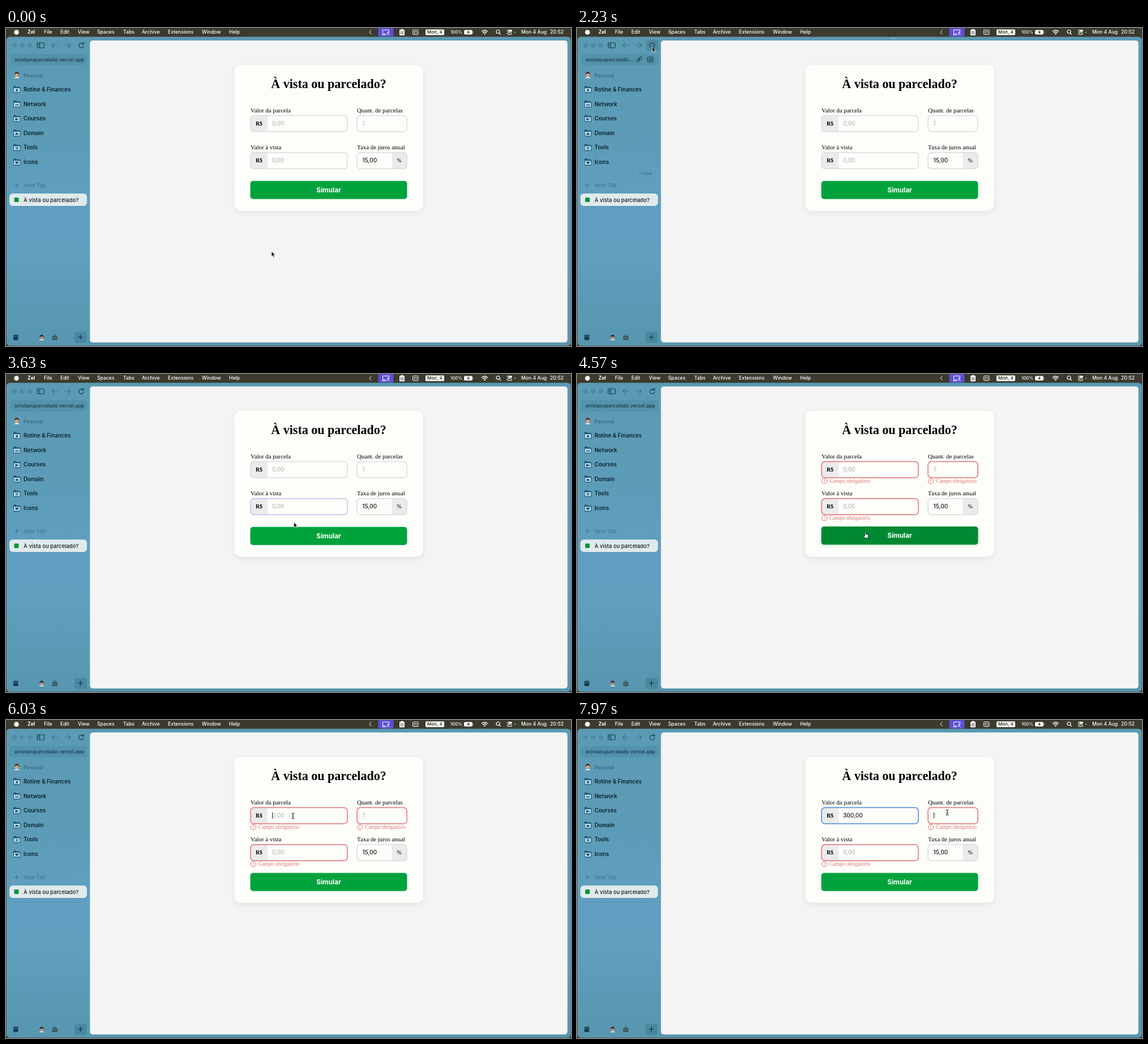
Recreate the animation shown at these times as an HTML page. Size 998 by 561 pixels, loop 8000 ms.

```html
<!DOCTYPE html>
<html lang="pt-BR">
<head>
<meta charset="utf-8">
<title>À vista ou parcelado?</title>
<style>
  html, body { margin: 0; width: 100%; height: 100%; overflow: hidden; background: #3c3a2e; }
  svg { display: block; width: 100%; height: 100%; }
  text { white-space: pre; }
  .ui { font-family: Inter, sans-serif; font-weight: 500; }
  .bold { font-weight: 600; }
  .serif { font-family: "Liberation Serif", serif; }
  .input { font: 400 10px Inter, sans-serif; }
  .filled { font-weight: 500; fill: #161618; }
  .line { fill: none; stroke-linecap: round; stroke-linejoin: round; }
</style>
</head>
<body>
<svg viewBox="0 0 998 561" xmlns="http://www.w3.org/2000/svg">
  <defs>
    <linearGradient id="wall" x2="0" y2="1">
      <stop offset="0" stop-color="#5b9ab3"/>
      <stop offset=".35" stop-color="#5d9cb8"/>
      <stop offset=".6" stop-color="#609fc2"/>
      <stop offset=".72" stop-color="#5f9ebd"/>
      <stop offset="1" stop-color="#5796af"/>
    </linearGradient>
    <filter id="soft" x="-10%" y="-10%" width="120%" height="125%">
      <feDropShadow dx="0" dy="3" stdDeviation="5" flood-color="#303050" flood-opacity=".08"/>
    </filter>
    <filter id="lift" x="-5%" y="-20%" width="110%" height="160%">
      <feDropShadow dx="0" dy="2" stdDeviation="2" flood-color="#008832" flood-opacity=".2"/>
    </filter>
  </defs>

  <rect width="998" height="561" fill="#3c3a2e"/>
  <rect x=".7" y="15.5" width="997" height="545" rx="6" fill="url(#wall)"/>

  <!-- menu bar -->
  <g id="menu" class="ui" font-size="8.65" fill="#fff">
    <circle cx="18.5" cy="7.5" r="4.3"/>
    <text x="38" y="10.3" style="font-weight:700">Zel</text>
    <path class="line" d="M645 4l-3 3.5 3 3.5" stroke="#fff"/>
    <rect x="657.5" width="27" height="15" rx="2" fill="#5c50d4"/>
    <g class="line" stroke="#fff">
      <path d="M671 10.5h-5.500v-7h11v3M664.500 12h6"/>
      <circle cx="675" cy="8" r="1.2"/><path d="M672.500 12q2.500-3 5 0"/>
    </g>
    <rect x="695" y="3" width="9" height="10" rx="1"/><rect x="697.500" y="1.700" width="4" height="2.600" rx="1"/>
    <path d="M696.500 6.500h6M696.500 8.500h6M696.500 10.500h6" stroke="#44443c" stroke-width=".8"/>
    <rect class="line" x="718.500" y="3.500" width="9.500" height="8" rx="1" stroke="#fff"/>
    <path d="M720 6.500h6.500M720 9h3M724.500 9h2" stroke="#fff"/>
    <rect x="741" y="2.500" width="33" height="10" rx="1.500"/>
    <text class="bold" x="744" y="10.200" font-size="8" fill="#33332d">Mon, 4</text>
    <text x="785" y="10" font-size="7.800">100%</text>
    <rect x="809" y="3.500" width="15" height="8" rx="2.500"/><path d="M825 6v3q1.500-1.500 0-3"/>
    <path d="M818 3.800l-4 4.200h2.500l-1 3 4-4.200h-2.500z" fill="#33332d"/>
    <path class="line" d="M840.500 6q5-4 10 0M842.500 8.300q3-2.400 6 0" stroke="#fff" stroke-width="1.500"/>
    <circle cx="845.500" cy="10.500" r="1.200"/>
    <g class="line" stroke="#fff" stroke-width="1.200"><circle cx="869" cy="6.500" r="3"/><path d="M871.200 8.700l2.300 2.500"/></g>
    <rect x="885" y="3" width="9" height="3.800" rx="1.900"/>
    <rect class="line" x="885.500" y="8.300" width="8" height="3.200" rx="1.600" stroke="#fff"/>
    <circle cx="887" cy="4.900" r="1.100" fill="#3c3a2e"/>
    <circle cx="899" cy="7.500" r="1.300" fill="#35c759"/>
    <text x="910" y="10.300">Mon 4 Aug</text><text x="961" y="10.300">20:52</text>
  </g>

  <!-- sidebar -->
  <g id="sidebar" class="ui" fill="#0b212c">
    <g fill="#4f8ba3"><circle cx="15" cy="30.500" r="4.300"/><circle cx="28.500" cy="30.500" r="4.300"/><circle cx="42" cy="30.500" r="4.300"/></g>
    <g class="line" stroke="#173f52" stroke-width="1.200">
      <rect x="55" y="26" width="12.500" height="9" rx="1.800"/><path d="M59.500 26v9M56.800 28.500h1M56.800 30.500h1"/>
    </g>
    <g class="line" stroke="#3c748e" stroke-width="1.200"><path d="M91 30.500h-10m4-4l-4 4 4 4M104 30.500h10m-4-4l4 4-4 4"/></g>
    <rect id="reloadGlow" x="122" y="20.500" width="21.500" height="20" rx="4" fill="#397287" fill-opacity=".4"/>
    <path id="reload" class="line" d="M136.500 28a4.300 4.300 0 1 0 .8 3.500M137 25v3.300h-3.300" stroke="#173f52" stroke-width="1.200"/>
    <rect x="7" y="46" width="136" height="19.500" rx="5" fill="#34738d" fill-opacity=".2"/>
    <text id="address" x="15" y="59" font-size="8.700" fill="#173a4a"></text>
    <g id="tools">
      <g class="line" stroke="#173f52" stroke-width="1.100">
        <g transform="rotate(-45 110 55.500)"><rect x="104.500" y="53.500" width="6" height="4" rx="2"/><rect x="109.500" y="53.500" width="6" height="4" rx="2"/></g>
        <rect x="124.500" y="51" width="10" height="9" rx="2"/><path d="M126.500 54h6M126.500 57h6M130.500 53v2M128.500 56v2"/>
      </g>
      <text class="bold" x="109" y="259" font-size="6.300" fill="#386a82">↓ Clear</text>
    </g>
    <path d="M13.500 88.500q5.500-5 11 0z" fill="#e9eef0"/><circle cx="19" cy="82.500" r="3.600" fill="#d9a17b"/>
    <path d="M15 82.500q0-5 4-5t4 5q-1.500-2.500-4-2.500t-4 2.500" fill="#382a27"/>
    <text class="bold" x="31" y="86.500" font-size="9.100" fill="#3b6c84">Pessoal</text>
    <g id="folders"></g>
    <path class="line" d="M15 277.500h7M18.500 274v7" stroke="#3c718c"/>
    <text x="31" y="281" font-size="9.300" fill="#437b98">New Tab</text>
    <rect x="6" y="292.500" width="137" height="22.500" rx="6" fill="#204a60" fill-opacity=".15"/>
    <rect x="6" y="292" width="137" height="22" rx="6" fill="#e0eaec"/>
    <rect x="14.500" y="299" width="8" height="8" rx="1.500" fill="#07923a"/>
    <text x="31" y="306.500" font-size="9.450" fill="#10191e">À vista ou parcelado?</text>
    <rect x="121" y="536" width="21.500" height="19.500" rx="4" fill="#3d7b92" fill-opacity=".55"/>
    <path class="line" d="M127.500 545.500h8M131.500 541.500v8" stroke="#102c39" stroke-width="1.200"/>
    <path d="M13 545h8.500v4q0 1.500-1.500 1.500h-5.500q-1.500 0-1.500-1.500zM12.500 542h9.500v2.300h-9.500zM15 540.300h2v1h-2zM18.500 540.300h2v1h-2z" fill="#163b4c"/>
    <path d="M58 551q5-5 10 0z" fill="#d6dfe3"/><circle cx="63" cy="545.700" r="3" fill="#c6916f"/><path d="M59.500 546q0-5 3.500-5t3.500 5q-3.500-4-7 0" fill="#382a27"/>
    <rect x="81.500" y="543.500" width="9.500" height="7" rx="1" fill="#36535c"/><path class="line" d="M84.500 543v-1.500h3.500v1.500" stroke="#36535c"/><path d="M82 547h8.500" stroke="#6f8d92"/>
  </g>

  <!-- page -->
  <rect x="148.300" y="22" width="843.400" height="532.700" rx="5" fill="#f4f4f4"/>
  <rect id="loader" x="553" y="17.500" width="10" height="1.500" rx=".7" fill="#a5cbd9" opacity=".5"/>
  <rect x="403.500" y="65" width="333" height="257" rx="11" fill="#fdfdfa" filter="url(#soft)"/>
  <text class="serif" x="570" y="106.300" font-size="22.050" font-weight="700" text-anchor="middle">À vista ou parcelado?</text>
  <g id="form"></g>
  <g id="button">
    <rect x="431.500" y="269.700" width="277" height="32.100" rx="5"/>
    <text class="ui" x="570" y="289.800" font-size="11.700" style="font-weight:700" fill="#fff" text-anchor="middle">Simular</text>
  </g>
  <path id="caret" stroke="#333" stroke-width="1"/>

  <g id="pointer">
    <path data-kind="arrow" d="M0 0v9.300l2.100-2 1.500 3.400 1.600-.7-1.500-3.300h2.900z" fill="#111" stroke="#fff" stroke-width=".7"/>
    <path data-kind="hand" d="M-.5 0q1-1.300 1.900 0v2.700q3.900.2 4.100 2v2.500l-1.200 2.300h-4.300q-2.600-2.600-3-4.300 1-.8 2.500.7z" fill="#fff" stroke="#222" stroke-width=".9"/>
    <path data-kind="beam" class="line" d="M-2.200-4.700Q0-4.700 0-3.200Q0-4.700 2.200-4.700M0-3.500v7.500M-2.200 5Q0 5 0 3.500Q0 5 2.200 5M-1.200.5h2.400" stroke="#222" stroke-width="1"/>
  </g>
</svg>
<script>
const LOOP = 8000;
const $ = id => document.getElementById(id);
const clamp = v => Math.max(0, Math.min(1, v));
const ease = v => v * v * (3 - 2 * v);
const ramp = (t, start, length = 150) => clamp((t - start) / length);
const mix = (a, b, k) => `rgb(${a.map((v, i) => Math.round(v + (b[i] - v) * k))})`;

const GREY = [218, 218, 226], HOVER = [176, 188, 240], RED = [229, 112, 112], BLUE = [68, 134, 228];
const GREEN = [0, 162, 60], DARK_GREEN = [0, 137, 50];

// Moves: start, end, destination x, y
const START = [469, 394];
const MOVES = [
  [200, 960, 217, 168], [1250, 1900, 133, 33], [2480, 3440, 507, 225],
  [3460, 3740, 509, 280], [5130, 5700, 507, 169], [7120, 7480, 654, 163]
];
const KEYS = [[6380, '0,03'], [6580, '0,30'], [6720, '3,00'], [6850, '30,00'], [6980, '300,00']];
const CLICK = { reload: 2100, submit: 4330, amount: 5880, count: 7840 };

const menus = [['File', 67], ['Edit', 96], ['View', 127], ['Spaces', 161], ['Tabs', 207],
  ['Archive', 240], ['Extensions', 286], ['Window', 346], ['Help', 394]];
$('menu').insertAdjacentHTML('beforeend',
  menus.map(([name, x]) => `<text x="${x}" y="10.300">${name}</text>`).join(''));

const folders = [
  ['Rotine & Finances', 'M-2.500 2q1-1 1-2.500a1.500 1.500 0 0 1 3 0q0 1.500 1 2.500z'],
  ['Network', 'M-3 2q1.500-3 3 0 1.500-3 3 0zM-2.300-1h1.600v1.600h-1.600zM.7-1h1.600v1.600h-1.600z'],
  ['Courses', 'M-3-1.500h4v3.500h-4zM1.500 0l1.500-1v2.500z'],
  ['Domain', 'M-2.500 2q-1.500-2 .8-2.300 1-2.700 3 0 2.700.3 1.200 2.300z'],
  ['Tools', 'M-2.500-2l1-.5 4 4-1 1zM2.500-2l-1-.5-4 4 1 1z'],
  ['Icons', 'M0 2.500q-5-3.500-2-4.500 1.500-.2 2 1 .5-1.200 2-1 3 1-2 4.500']
];
$('folders').innerHTML = folders.map(([name, glyph], i) => `
  <g transform="translate(0 ${108.5 + i * 25.6})">
    <path d="M13.500-4.500q0-1 1-1h3l1.500 1.500h5q1 0 1 1v7.500q0 1-1 1h-9.500q-1 0-1-1z" fill="#1c5a78" stroke="#174f6b"/>
    <rect x="13.500" y="-2.800" width="11.500" height="8" rx="1.200" fill="#b4dcea" stroke="#1b5876" stroke-width=".8"/>
    <path transform="translate(19.300 1)" d="${glyph}" fill="#174f6b"/>
    <text class="bold" x="31" y="3.500" font-size="9.700">${name.replace('&', '&amp;')}</text>
  </g>`).join('');

function addField(id, label, x, y, width, value, unit, unitX) {
  const left = unitX < x + 20;
  const block = left ? `M${x + 30} ${y}H${x + 6}q-6 0-6 6v16.500q0 6 6 6h24z`
    : `M${x + width - 26.5} ${y}h20.500q6 0 6 6v16.500q0 6-6 6h-20.500z`;
  $('form').insertAdjacentHTML('beforeend', `
    <text class="serif" x="${x}" y="${y - 5.5}" font-size="10.900">${label}</text>
    <rect x="${x}" y="${y}" width="${width}" height="28.500" rx="6" fill="#fdfdfa"/>
    ${unit ? `<path d="${block}" fill="#ebebec"/><text class="serif" x="${unitX}" y="${y + 17.3}" font-size="9.800"
      font-weight="${left ? 700 : 400}" text-anchor="middle">${unit}</text>` : ''}
    <rect id="${id}Edge" x="${x}" y="${y}" width="${width}" height="28.500" rx="6" fill="none" stroke-width="1.500" stroke="${mix(GREY, GREY, 0)}"/>
    <text id="${id}Value" class="input" x="${x + (left ? 38 : 9.5)}" y="${y + 17.7}" fill="#a9a9ad">${value}</text>
    <g id="${id}Error" opacity="0" fill="#e5706f">
      <circle class="line" cx="${x + 5}" cy="${y + 34.5}" r="4.700" stroke="#e5706f"/>
      <path d="M${x + 5} ${y + 32}v3m0 1.200v1" stroke="#e5706f"/>
      <text class="serif" x="${x + 14}" y="${y + 37.3}" font-size="9.500">Campo obrigatório</text>
    </g>`);
}
addField('amount', 'Valor da parcela', 432, 154.5, 171, '0,00', 'R$', 447);
addField('count', 'Quant. de parcelas', 620, 154.5, 88, '1');
addField('cash', 'Valor à vista', 432, 219.7, 171, '0,00', 'R$', 447);
addField('rate', 'Taxa de juros anual', 620, 219.7, 88, '15,00', '%', 694.5);
$('rateValue').classList.add('filled');

function pointerAt(t) {
  let [x, y] = START;
  for (const [start, end, toX, toY] of MOVES) {
    const k = ease(ramp(t, start, end - start));
    x += (toX - x) * k;
    y += (toY - y) * k;
  }
  return [x, y];
}

function pointerKind(x, y) {
  const row = (y > 154 && y < 183) || (y > 219 && y < 248);
  if (row && ((x > 462 && x < 603) || (x > 620 && x < 682))) return 'beam';
  return x > 432 && x < 708 && y > 269 && y < 302 ? 'hand' : 'arrow';
}

function drawCaret(t) {
  const onCount = t >= CLICK.count;
  const lastKey = KEYS.filter(([time]) => time <= t).pop();
  const since = t - (onCount ? CLICK.count : lastKey ? lastKey[0] : CLICK.amount);
  const visible = t >= CLICK.amount && since % 1000 < 500;
  const typed = !onCount && lastKey ? $('amountValue').getComputedTextLength() : 0;
  $('caret').setAttribute('d', visible ? `M${(onCount ? 630 : 470.5) + typed} 163v11` : '');
}

function draw(t) {
  const [x, y] = pointerAt(t);
  const kind = pointerKind(x, y);
  $('pointer').setAttribute('transform', `translate(${x} ${y})`);
  for (const shape of $('pointer').children) shape.style.display = shape.dataset.kind === kind ? '' : 'none';

  const inSidebar = x < 148;
  $('tools').style.display = inSidebar ? '' : 'none';
  $('address').textContent = inSidebar ? 'avistaouparcelado…' : 'avistaouparcelado.vercel.app';
  $('reloadGlow').style.display = x > 121 && x < 144 && y < 41 ? '' : 'none';
  $('reload').setAttribute('transform', `rotate(${360 * ease(ramp(t, CLICK.reload, 350))} 133 30.500)`);
  $('loader').style.display = t > CLICK.reload && t < 2420 ? '' : 'none';

  const failed = ramp(t, CLICK.submit);
  const fixed = t >= KEYS[0][0];
  const cashHover = ramp(t, 3330) - ramp(t, 3600);
  $('amountEdge').setAttribute('stroke', fixed ? mix(RED, BLUE, ramp(t, KEYS[0][0])) : mix(GREY, RED, failed));
  $('countEdge').setAttribute('stroke', mix(GREY, RED, failed));
  $('cashEdge').setAttribute('stroke', failed ? mix(GREY, RED, failed) : mix(GREY, HOVER, cashHover));
  $('amountError').setAttribute('opacity', fixed ? 0 : failed);
  $('countError').setAttribute('opacity', failed);
  $('cashError').setAttribute('opacity', failed);

  $('amountValue').textContent = KEYS.reduce((text, [time, next]) => t >= time ? next : text, '0,00');
  $('amountValue').classList.toggle('filled', fixed);
  drawCaret(t);

  const hover = ramp(t, 3660) - ramp(t, 5260);
  $('button').setAttribute('transform', `translate(0 ${-0.7 * hover})`);
  $('button').setAttribute('fill', mix(GREEN, DARK_GREEN, hover));
  $('button').setAttribute('filter', hover > 0 ? 'url(#lift)' : 'none');
}

const began = performance.now();
function tick() {
  draw((performance.now() - began) % LOOP);
  requestAnimationFrame(tick);
}
tick();
</script>
</body>
</html>
```
